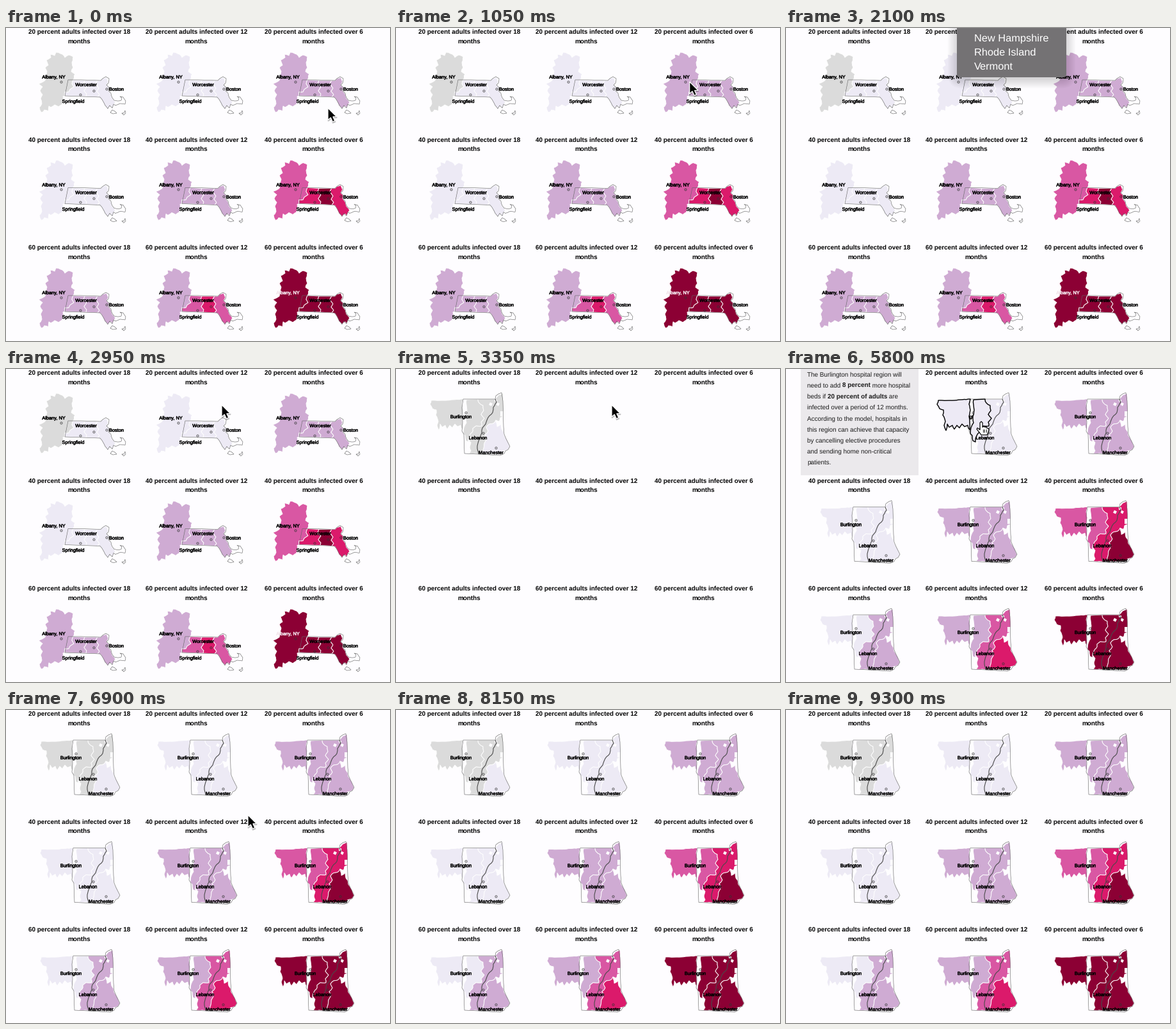
Write a matplotlib script that moves like this. It is 600 px wide and 489 px high and loops after 9350 ms.

```python
import numpy as np
import matplotlib.pyplot as plt
from matplotlib.animation import FuncAnimation
from matplotlib.collections import LineCollection, PolyCollection
from matplotlib.patches import FancyBboxPatch, Polygon, Rectangle
from matplotlib.patheffects import withStroke
from matplotlib.textpath import TextPath
from matplotlib.transforms import Affine2D

W, H, STEP, LOOP = 600, 489, 50, 9350
COL_W, ROW_H = 183, 168.5
PAGE = "#fefdff"
SHADES = ["#dbdbdb", "#edeaf5", "#cfabd3", "#d957a3", "#db1a6b", "#8c0034"]

plt.rcParams["font.family"] = "Liberation Sans"
plt.rcParams["text.hinting"] = "none"
rng = np.random.default_rng(4)

fig = plt.figure(figsize=((W + 1e-6) / 72, (H + 1e-6) / 72), dpi=72,
                 facecolor=PAGE)
ax = fig.add_axes([0, 0, 1, 1])
ax.set_xlim(0, W)
ax.set_ylim(H, 0)
ax.axis("off")


def rough(points, amp=0.8, step=3):
    """Break a line into short, slightly shaken pieces."""
    out = []
    for a, b in zip(points, points[1:]):
        a, b = np.array(a, float), np.array(b, float)
        n = max(1, int(np.hypot(*(b - a)) / step))
        for k in range(n):
            shake = rng.uniform(-amp, amp, 2) if k else 0
            out.append(tuple(a + (b - a) * k / n + shake))
    return out + [points[-1]]


# Massachusetts and the Albany area
albany_edge = rough([
    (92, 106), (89, 107), (88, 119), (82, 123), (76, 120), (70, 124),
    (67, 122), (66, 130), (60, 128), (55, 132), (52, 124), (56, 118),
    (54, 110), (57, 104), (53, 98), (57, 92), (51, 87), (61, 82),
    (62, 76), (64, 68), (61, 62), (66, 58), (63, 50), (70, 46), (69, 41),
    (76, 43), (78, 38), (88, 41), (92, 46), (98, 42), (105, 45),
    (103, 54), (105, 62), (102, 68), (108, 72), (105, 81)])
berkshire = rough([(105, 81), (103, 87), (106, 92), (100, 96), (98, 100),
                   (92, 100), (92, 106)], 0.6)
spring_worc = rough([(123, 82), (121, 88), (126, 92), (122, 98),
                     (126, 103), (125, 107)], 0.6)
worc_bost = rough([(143, 82), (140, 88), (145, 94), (142, 99),
                   (146, 104), (143, 108)], 0.6)
boston_coast = rough([
    (143, 108), (148, 109), (151, 114), (154, 121), (159, 126), (164, 122),
    (166, 125), (169, 119), (171, 116), (166, 110), (164, 103), (160, 98),
    (161, 93), (157, 89), (160, 84), (157, 77), (151, 79), (148, 82),
    (143, 82)], 0.4)
ma_border = [(147, 108), (92, 106), (97, 81), (117, 81), (148, 82),
             (151, 79), (156, 76)]
ma_coast = rough([
    (156, 76), (161, 79), (160, 86), (157, 89), (161, 93), (160, 98),
    (164, 102), (166, 109), (169, 113), (174, 114), (180, 113), (181, 109),
    (178, 107), (183, 108), (187, 114), (186, 119), (178, 118), (171, 121),
    (168, 119), (166, 125), (162, 121), (159, 126), (155, 121), (152, 115),
    (147, 108)], 0.5)
vineyard = rough([(163, 132), (166, 128), (170, 130), (173, 133),
                  (167, 134), (163, 132)], 0.3)
nantucket = rough([(181, 133), (184, 133), (186, 129), (187, 133),
                   (184, 136), (181, 133)], 0.3)

MASS = dict(
    regions=[[albany_edge + berkshire],
             [spring_worc + berkshire[::-1]],
             [spring_worc + worc_bost[::-1]],
             [worc_bost + boston_coast]],
    lines=[ma_border, ma_coast, vineyard, nantucket],
    river=[],
    holes=[],
    cities=[("Albany, NY", 74.5, 79, 86, 84), ("Worcester", 125, 91, 137, 98),
            ("Springfield", 105, 117, 116, 104), ("Boston", 172.5, 98, 157, 95)],
    levels=["0111", "1111", "2222", "1111", "2222", "3454",
            "2222", "2343", "5555"])

# Vermont and New Hampshire
ny_edge = rough([
    (104, 95), (101, 88), (96, 90), (92, 86), (88, 92), (84, 88), (80, 94),
    (77, 88), (72, 91), (69, 86), (67, 96), (64, 88), (66, 82), (62, 72),
    (63, 64), (57, 62), (53, 55), (55, 49)])
ny_shore = rough([(55, 49), (80, 49), (105, 47), (103, 55), (105, 64),
                  (103, 74), (104, 84), (104, 95)], 0.4)
burl_leb = rough([
    (128, 47), (130, 53), (136, 57), (137, 65), (133, 71), (138, 77),
    (133, 83), (134, 89), (125, 89), (120, 93), (119, 99), (115, 104),
    (113, 110)])
vt_shore = rough([
    (113, 110), (113, 114), (109, 112), (108, 104), (105, 101), (106, 92),
    (110, 84), (109, 74), (111, 64), (110, 56), (110, 48)], 0.6)
leb_south = rough([(113, 110), (117, 115), (115, 122), (117, 128),
                   (114, 132), (133, 132)], 0.5)
leb_man = rough([
    (133, 132), (137, 124), (138, 116), (142, 109), (139, 103), (144, 97),
    (141, 91), (146, 86), (152, 85), (156, 80)])
leb_east = rough([(156, 80), (161, 82), (163, 76), (168, 74)], 0.6) + [
    (168, 58), (167, 38), (160, 41), (155, 47), (128, 47)]
man_coast = rough([
    (156, 80), (158, 90), (164, 86), (165, 94), (168, 98), (169, 104),
    (173, 110), (178, 121), (175, 126), (168, 128), (165, 132),
    (133, 132)], 0.5)
river = rough([
    (155, 47), (157, 52), (152, 60), (151, 68), (146, 73), (142, 80),
    (140, 86), (135, 92), (134, 100), (131, 108), (128, 116), (127, 124),
    (129, 133)], 0.6)
vt_border = [(155, 47), (105, 47), (103, 60), (104, 84), (103, 97),
             (106, 102), (107, 132), (129, 133)]
nh_border = [(155, 47), (156, 42), (160, 39), (165, 37), (167, 50),
             (168, 90), (169, 102), (172, 109), (178, 121), (175, 126),
             (171, 128), (169, 132), (163, 135), (129, 133)]


def block(x, y, w, h):
    return [(x, y), (x + w, y), (x + w, y + h), (x, y + h)]


NORTH = dict(
    regions=[[ny_edge + ny_shore, burl_leb + vt_shore],
             [burl_leb + leb_south + leb_man + leb_east],
             [leb_man + man_coast]],
    lines=[vt_border, nh_border],
    river=[river],
    holes=[[(147, 52), (151, 54), (149, 58), (145, 56)],
           [(158, 52), (162, 54), (160, 58), (157, 56)],
           block(162.5, 66, 5, 8), block(154, 48, 4, 3.5)],
    cities=[("Burlington", 101.5, 77, 109, 68), ("Lebanon", 128, 110, 136, 100),
            ("Manchester", 148.5, 133, 156, 123)],
    levels=["001", "111", "222", "111", "222", "345", "122", "234", "555"])


def draw_map(area, panel):
    """Draw one small map and return its artists."""
    dx, dy = panel % 3 * COL_W, panel // 3 * ROW_H
    shift = Affine2D().translate(dx, dy) + ax.transData
    level = area["levels"][panel]
    polys, fills = [], []
    for shapes, c in zip(area["regions"], level):
        polys += shapes
        fills += [SHADES[int(c)]] * len(shapes)
    parts = [
        PolyCollection(polys, facecolors=fills, edgecolors="white",
                       linewidths=0.9, transform=shift, zorder=2),
        PolyCollection(area["holes"], facecolors=PAGE, transform=shift,
                       zorder=3),
        LineCollection(area["lines"], colors="#666666", linewidths=0.6,
                       transform=shift, zorder=4),
        LineCollection(area["river"], colors="#4a4a4a", linewidths=1.1,
                       transform=shift, zorder=4)]
    for p in parts:
        ax.add_collection(p, autolim=False)
    xy = np.array([(c[3] + dx, c[4] + dy) for c in area["cities"]])
    parts += ax.plot(*xy.T, "o", ms=3.2, mfc="none", mec="#333333", mew=0.7,
                     zorder=5)
    for name, x, y, _, _ in area["cities"]:
        pale = name.startswith("Albany") and level[0] == "5"
        color = "#f4e6ec" if pale else "black"
        parts.append(ax.text(
            x + dx, y + dy, name, size=7.4, ha="center", va="baseline",
            color=color, zorder=6,
            path_effects=[withStroke(linewidth=0.4, foreground=color)]))
    return parts


mass_maps = [draw_map(MASS, k) for k in range(9)]
north_maps = [draw_map(NORTH, k) for k in range(9)]

for k in range(9):
    share, months = (20, 40, 60)[k // 3], (18, 12, 6)[k % 3]
    x, y = 114.5 + k % 3 * COL_W, 9 + k // 3 * ROW_H
    for dy, line in ((0, f"{share} percent adults infected over {months}"),
                     (14.5, "months")):
        ax.text(x, y + dy, line, size=9.87, weight="bold", ha="center",
                va="baseline", zorder=7)


def advance(text):
    """Width of a text artist, trailing spaces included."""
    font, size = text.get_fontproperties(), text.get_size()

    def right(s):
        return TextPath((0, 0), s, size=size, prop=font).get_extents().x1
    return right(text.get_text() + ".") - right(".")


def tooltip(lines, bottom):
    """Text box; ** marks the start and end of bold text."""
    parts = [ax.add_patch(Rectangle((23, -5), 183.5, bottom + 5, fc="#ebe9ec",
                                    ec="none", zorder=20))]
    for i, line in enumerate(lines):
        x = 33
        for j, piece in enumerate(line.split("**")):
            if piece:
                parts.append(ax.text(
                    x, 11.8 + 17.2 * i, piece, size=9.9, color="#1a1a1a",
                    weight="bold" if j % 2 else "normal", va="baseline",
                    zorder=21))
                x += advance(parts[-1])
    return parts


def outline(region):
    shift = Affine2D().translate(COL_W, 0) + ax.transData
    return [ax.add_patch(Polygon(p, fc=SHADES[1], ec="black", lw=1.4,
                                 joinstyle="round", transform=shift, zorder=10))
            for p in region]


MODEL = ["According to the model, hospitals in",
         "this region can achieve that capacity",
         "by cancelling elective procedures",
         "and sending home non-critical", "patients."]
lebanon = tooltip([
    "The Lebanon hospital region will", "need to add **13 percent** more",
    "hospital beds if **20 percent of**",
    "**adults** are infected over a period of", "12 months."] + MODEL, 183.5)
lebanon += outline(NORTH["regions"][1])
burlington = tooltip([
    "The Burlington hospital region will",
    "need to add **8 percent** more hospital",
    "beds if **20 percent of adults** are",
    "infected over a period of 12 months."] + MODEL, 166.5)
burlington += outline(NORTH["regions"][0])


def rounded(x, y, w, h, r, **kw):
    return ax.add_patch(FancyBboxPatch(
        (x + r, y + r), w - 2 * r, h - 2 * r,
        boxstyle=f"round,pad={r}", ec="none", **kw))


menu = [rounded(267 - g, -40, 171 + 2 * g, 120 + g, 8 + g, fc="black",
                alpha=0.018, zorder=24) for g in range(0, 16, 2)]
menu.append(rounded(267, -40, 171, 117, 5, fc="#747274", zorder=25))
for i, state in enumerate(["New Hampshire", "Rhode Island", "Vermont"]):
    menu.append(ax.text(294, 21 + 22 * i, state, size=16.4, color="white",
                        va="baseline", zorder=27))
marked = ax.add_patch(Rectangle((267, 4), 171, 22, fc="#3a74d8", ec="none",
                                zorder=26))

ARROW = np.array([(0, 0), (0, 17.5), (4, 13.8), (6.8, 20), (10, 18.6),
                  (7.3, 12.6), (12.5, 12.6)]) * 1.08
HAND = [(-2, 1), (0, -1), (2, 1), (2, 8), (4, 6.5), (6, 8), (8, 7.5),
        (9, 9.5), (11, 9.5), (12, 12), (11, 16), (9, 20), (0, 20), (-3, 16),
        (-7, 11), (-6, 9), (-2, 12)]
arrow = [ax.add_patch(Polygon(ARROW + (0.5, 1.5), fc="black", alpha=0.2,
                              ec="black", lw=2, zorder=40)),
         ax.add_patch(Polygon(ARROW, fc="black", ec="white", lw=1.3,
                              zorder=41))]
hand = [ax.add_patch(Polygon(HAND, fc="white", ec="black", lw=1.2,
                             joinstyle="round", zorder=41)),
        ax.add_collection(LineCollection(
            [[(x, 11.5), (x, 16.5)] for x in (2.5, 5, 7.5)],
            colors="black", linewidths=0.9, zorder=42), autolim=False)]

# time, x, y of the pointer tip
POINTER = np.array([
    (0, 503, 125), (300, 503, 125), (950, 470, 95), (1500, 340, -32),
    (2200, 340, -32), (2700, 337, 56), (3400, 337, 56), (3900, 340, 66),
    (4700, 340, 67), (5300, 306, 83), (5900, 305, 83), (6600, 372, 158),
    (6900, 378, 164), (7600, 382, 180), (LOOP, 382, 180)])


def pointer_at(t):
    i = min(np.searchsorted(POINTER[:, 0], t, "right"), len(POINTER) - 1)
    a, b = POINTER[i - 1], POINTER[i]
    u = (t - a[0]) / (b[0] - a[0])
    return a[1:] + (b[1:] - a[1:]) * u * u * (3 - 2 * u)


def show(parts, on):
    for p in parts:
        p.set_visible(bool(on))


def update(i):
    t = i * STEP
    for k in range(9):
        show(mass_maps[k], t < 3000)
        show(north_maps[k], t >= 3350 + 50 * k)
    x, y = pointer_at(t)
    open_menu = 1700 <= t < 2950
    show(menu, open_menu)
    row = int((y - 4) // 22)
    marked.set_y(4 + 22 * row)
    show([marked], open_menu and 0 <= row <= 2)
    over = 3900 <= t < 6250
    show(lebanon, over and t < 5100)
    show(burlington, over and t >= 5100)
    show(hand, over)
    show(arrow, not over and t < 7650)
    for p in arrow + hand:
        p.set_transform(Affine2D().translate(x, y) + ax.transData)
    return []


anim = FuncAnimation(fig, update, frames=LOOP // STEP, interval=STEP,
                     repeat=True, repeat_delay=0, blit=False)
plt.show()
```
